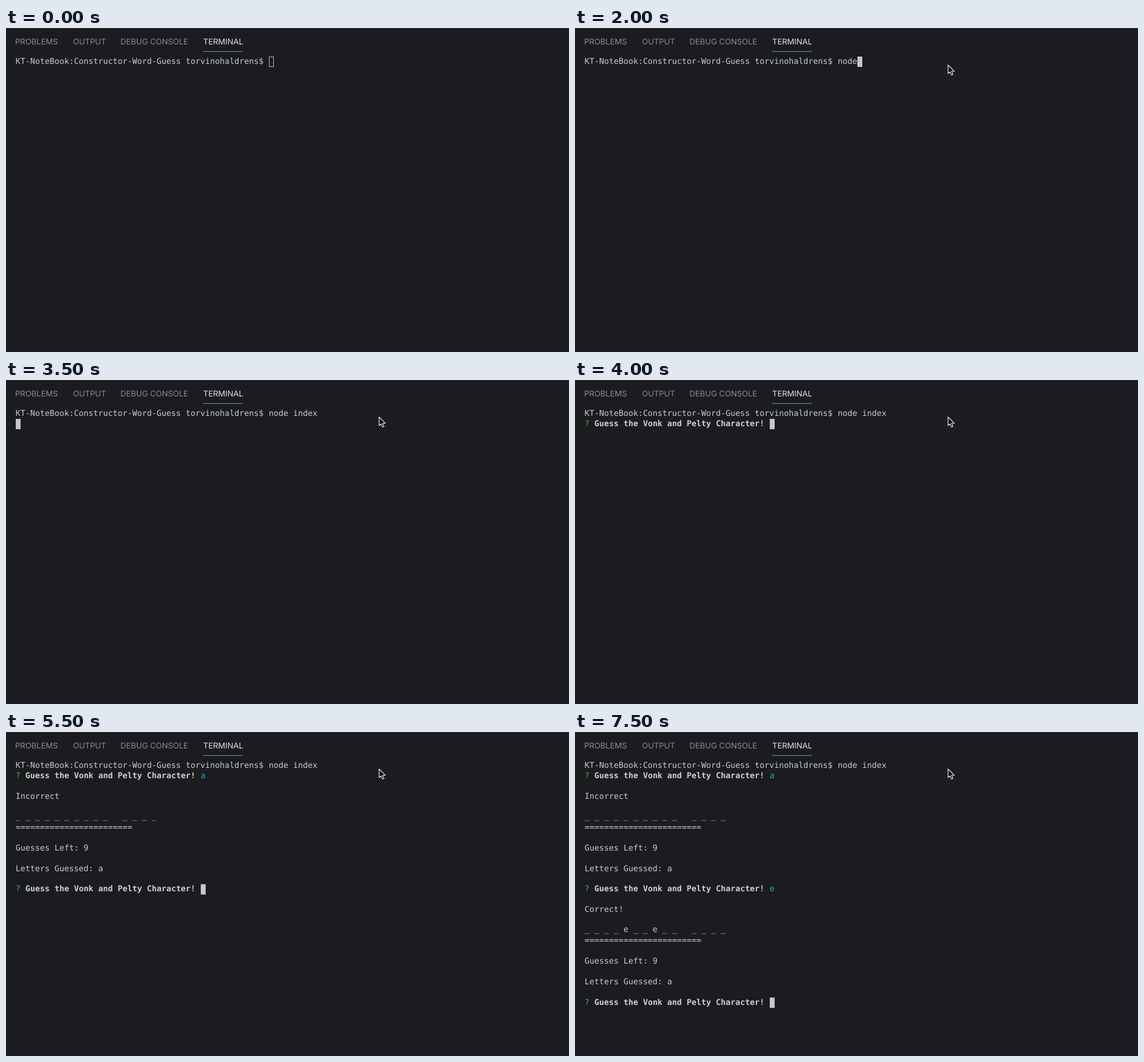
An HTML page that plays this animation: 925 px wide and 533 px high, repeating every 8000 ms.

```html
<!DOCTYPE html>
<html lang="en">
<head>
<meta charset="utf-8">
<title>Word guess terminal</title>
<style>
  html, body { margin: 0; width: 100%; height: 100%; overflow: hidden; background: #1b1c20; }
  svg { display: block; width: 925px; height: 533px; }
  text { white-space: pre; text-rendering: geometricPrecision; }
  .tabs { font: 13px Inter, "Open Sans", sans-serif; fill: #8b8c8e; }
  .tabs .on { fill: #e4e4e5; }
  .term { font: 13.288px "DejaVu Sans Mono", "Liberation Mono", monospace; fill: #cbcbcb; }
  .term .ask { font-weight: bold; fill: #d0d0d0; }
  .term .mark { fill: #4cae4f; }
  .term .answer { fill: #2ba3cf; }
</style>
</head>
<body>
<svg viewBox="0 0 925 533">
  <rect width="925" height="533" fill="#1b1c20"/>
  <rect width="925" height="1" fill="#36373b"/>
  <rect y="532" width="925" height="1" fill="#121316"/>
  <g class="tabs">
    <text x="15" y="27">PROBLEMS</text>
    <text x="110" y="27">OUTPUT</text>
    <text x="188" y="27">DEBUG CONSOLE</text>
    <text x="324" y="27" class="on">TERMINAL</text>
  </g>
  <rect x="324" y="38" width="65" height="1.2" fill="#1c9fc0"/>
  <g id="term" class="term"></g>
  <path id="mouse" visibility="hidden" d="M0 0V14.2L3.2 11.2L5.6 16.6L8 15.5L5.7 10.2H10.2Z"
    fill="#0c0c0e" stroke="#f2f2f2" stroke-width="1.1" stroke-linejoin="round"/>
</svg>
<script>
(() => {
  const LOOP = 8000, X0 = 15.8, Y0 = 47, CELL = 8, ROW = 16.95;
  const PROMPT = 'KT-NoteBook:Constructor-Word-Guess torvinohaldrens$ ';
  const ASK = 'Guess the Vonk and Pelty Character! ';
  const COMMAND = 'node index';

  // Each entry: start time, then the value held from there on.
  const typing = [[0, 0], [1750, 2], [2000, 4], [2250, 5], [2500, 7], [2750, 9], [3250, 10]];
  const pointer = [[0, null], [500, [688, 0]], [750, [628, 55]], [1000, [613, 61]]];

  const rounds = [
    { ask: 4000, type: 5250, reply: 5500, row: 1, key: 'a', result: 'Incorrect',
      word: '_ _ _ _ _ _ _ _ _ _   _ _ _ _' },
    { ask: 5500, type: 7250, reply: 7500, row: 12, key: 'e', result: 'Correct!',
      word: '_ _ _ _ e _ _ e _ _   _ _ _ _' },
    { ask: 7500, type: Infinity, reply: Infinity, row: 23, key: '' }
  ];

  const term = document.getElementById('term');
  const mouse = document.getElementById('mouse');

  const held = (steps, t) => steps.filter(s => s[0] <= t).pop()[1];
  const colX = col => X0 + col * CELL;
  const rowY = row => Y0 + row * ROW;

  function put(row, col, str, cls = '', lift = 0) {
    return `<text x="${colX(col)}" y="${rowY(row) + 12 - lift}" class="${cls}">${str}</text>`;
  }

  function caret(row, col, hollow) {
    const x = colX(col) + 0.2, y = rowY(row);
    return hollow
      ? `<rect x="${x + 0.5}" y="${y + 0.5}" width="7" height="16" fill="none" stroke="#b9b9ba"/>`
      : `<rect x="${x}" y="${y}" width="8" height="17" fill="#c6c6c7"/>`;
  }

  function playRound(r, t) {
    const end = 2 + ASK.length, done = t >= r.reply, typed = t >= r.type;
    let out = put(r.row, 0, '?', 'mark') + put(r.row, 2, ASK, 'ask');
    if (typed) out += put(r.row, end, r.key, done ? 'answer' : '');
    if (!done) return out + caret(r.row, end + (typed ? 1 : 0));
    return out
      + put(r.row + 2, 0, r.result)
      + put(r.row + 4, 0, r.word, '', 1)
      + put(r.row + 5, 0, '='.repeat(24))
      + put(r.row + 7, 0, 'Guesses Left: 9')
      + put(r.row + 9, 0, 'Letters Guessed: a');
  }

  function render(t) {
    const n = held(typing, t);
    let out = put(0, 0, PROMPT) + put(0, PROMPT.length, COMMAND.slice(0, n));
    if (t < 3500) out += caret(0, PROMPT.length + n, t < 1000);
    else if (t < 4000) out += caret(1, 0);
    for (const r of rounds) if (t >= r.ask) out += playRound(r, t);
    return out;
  }

  let shown = '';
  function draw(t) {
    const next = render(t), at = held(pointer, t);
    if (next !== shown) term.innerHTML = shown = next;
    mouse.setAttribute('visibility', at ? 'visible' : 'hidden');
    if (at) mouse.setAttribute('transform', `translate(${at[0]} ${at[1]})`);
  }

  const begin = performance.now();
  function tick() {
    draw((performance.now() - begin) % LOOP);
    requestAnimationFrame(tick);
  }
  tick();
})();
</script>
</body>
</html>
```
